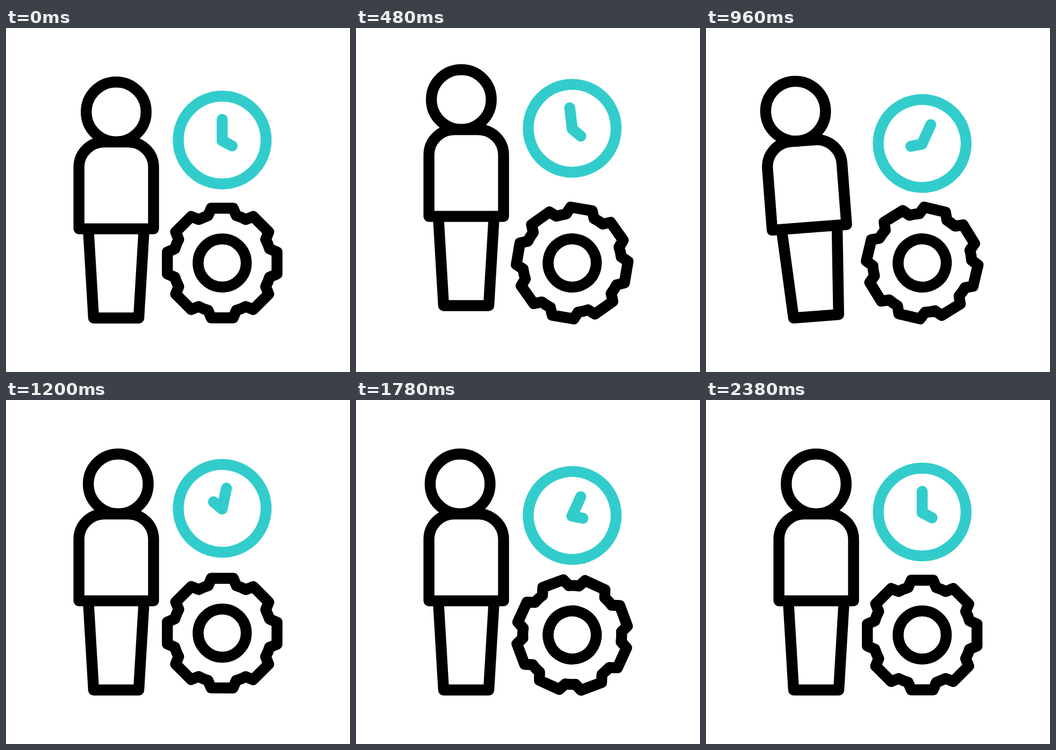
Animation of 640 by 640 pixels, one loop 2400 ms. Source, as an HTML page:

```html
<!DOCTYPE html>
<html lang="en">
<head>
<meta charset="utf-8">
<title>Person, clock and gear</title>
<style>
html, body { margin: 0; width: 100%; height: 100%; overflow: hidden; background: #fff; }
svg { display: block; width: 100%; height: 100%; }
.line { fill: none; stroke: #000; stroke-width: 20.4; stroke-linecap: round; stroke-linejoin: round; }
#clock { stroke: #33cccc; }
</style>
</head>
<body>
<svg viewBox="0 0 640 640">
  <g id="person" class="line">
    <path d="M153.2 374L163 539.5H247L256.8 374"/>
    <path d="M135.7 373.6V259a47 47 0 0 1 47-47h44.8a47 47 0 0 1 47 47V373.6z"/>
    <circle id="head" cx="205" cy="156.2" r="55.7"/>
  </g>
  <g id="clock" class="line">
    <circle cx="402.2" cy="208.4" r="81.7"/>
    <path d="M402.2 170V209.6"/>
    <path id="hour" d="M402.2 209.6L420.7 219.3"/>
  </g>
  <g id="gear" class="line">
    <path id="teeth"/>
    <circle cx="402.2" cy="437.2" r="44.8"/>
  </g>
</svg>
<script>
const LOOP = 2400, START = 200, TURN = 2000;
const CX = 402.2, CLOCK_Y = 208.4, GEAR_Y = 437.2;
const $ = id => document.getElementById(id);

// Smooth step from 0 to 1 over a span of time.
function ease(t, from, span) {
  const u = Math.min(1, Math.max(0, (t - from) / span));
  return u * u * (3 - 2 * u);
}

// Ease through evenly spaced values, starting from rest.
function through(t, from, step, values) {
  let sum = 0, last = 0;
  values.forEach((v, i) => {
    sum += (v - last) * ease(t, from + i * step, step);
    last = v;
  });
  return sum;
}

const hump = (t, from, step, peak) => through(t, from, step, [peak, 0]);
const sway = (t, low, high) => through(t, START, 410, [low, high, low, high, 0]);

function gearPath(teeth) {
  const root = 92, half = Math.PI / teeth, points = [];
  // Polar corners of one tooth: root, tip, tip, root.
  const tooth = [[root, -0.29], [104, -0.197], [104, 0.197], [root, 0.29]];
  for (let i = 0; i < teeth; i++) {
    tooth.forEach(([r, a], j) => {
      const angle = 2 * half * i + a;
      const x = CX + r * Math.sin(angle), y = GEAR_Y - r * Math.cos(angle);
      const cmd = j ? "L" : i ? `A${root} ${root} 0 0 1 ` : "M";
      points.push(`${cmd}${x.toFixed(2)} ${y.toFixed(2)}`);
    });
  }
  return points.join("") + "z";
}

const place = (id, y, angle, cx, cy) =>
  $(id).setAttribute("transform", `translate(0 ${y}) rotate(${angle} ${cx} ${cy})`);

function draw(now) {
  const t = now % LOOP;
  const turn = ease(t, START, TURN);
  place("person", hump(t, START, 200, -36), hump(t, 800, 200, -4.85), 163, 539.5);
  $("head").setAttribute("cx", 205 + through(t, START, 400, [-11.5, -9, 16.5, -11.5, 0]));
  place("clock", sway(t, -28.5, 8.5), sway(t, -9, 26.5), CX, CLOCK_Y);
  place("hour", 0, 360 * turn, CX, 209.6);
  place("gear", hump(t, 1000, 400, -7), 180 * turn, CX, GEAR_Y);
}

$("teeth").setAttribute("d", gearPath(8));
const start = performance.now();
function tick() {
  draw(performance.now() - start);
  requestAnimationFrame(tick);
}
tick();
</script>
</body>
</html>
```
